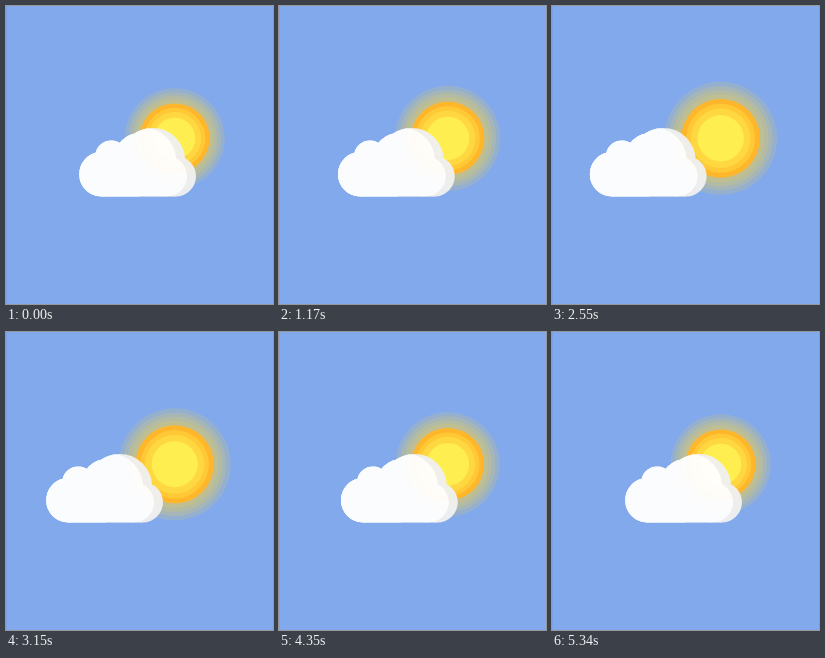
An HTML page for the animation above (5.37 s loop, 267x298 px).

```html
<!DOCTYPE html>
<html lang="en">
<head>
<meta charset="utf-8">
<title>Sun and cloud</title>
<style>
  html, body { margin: 0; width: 100%; height: 100%; overflow: hidden; background: #81a9ec; }
  svg { display: block; width: 267px; height: 298px; }
</style>
</head>
<body>
<svg viewBox="0 0 267 298">
  <defs>
    <g id="lobes">
      <circle cx="22.3" cy="168.2" r="22.3"/>
      <circle cx="32" cy="150.5" r="16"/>
      <circle cx="61" cy="153" r="26"/>
      <circle cx="73.5" cy="154.3" r="32.4"/>
      <circle cx="96.6" cy="170.3" r="20.2"/>
      <rect x="22.3" y="150" width="74.3" height="40.5"/>
    </g>
    <clipPath id="outline">
      <circle cx="22.3" cy="168.2" r="22.3"/>
      <circle cx="32" cy="150.5" r="16"/>
      <circle cx="61" cy="153" r="26"/>
      <circle cx="73.5" cy="154.3" r="32.4"/>
      <circle cx="96.6" cy="170.3" r="20.2"/>
      <rect x="22.3" y="150" width="74.3" height="40.5"/>
    </clipPath>
  </defs>
  <rect width="267" height="298" fill="#81a9ec"/>
  <rect width="1" height="298" fill="#7aa2e4"/>
  <g id="sun"></g>
  <g id="cloud" opacity=".97">
    <use href="#lobes" fill="#f0f0f0"/>
    <g clip-path="url(#outline)" fill="#fff">
      <use href="#lobes" x="-9"/>
      <rect y="120" width="60" height="71"/>
    </g>
  </g>
</svg>
<script>
  const LOOP = 5370;
  const sun = document.getElementById('sun');
  const cloud = document.getElementById('cloud');

  // radius, colour, opacity: halo first, core last
  const rings = [
    [56.5, '#ffd23c', .16], [52, '#ffd23c', .16], [48, '#ffd23c', .16], [44, '#ffd23c', .16],
    [39.4, '#ffb62a', 1], [34.5, '#ffc936', 1], [29.8, '#ffd740', 1], [23.2, '#ffee4f', 1]
  ];
  for (const [r, fill, opacity] of rings) {
    const disc = document.createElementNS('http://www.w3.org/2000/svg', 'circle');
    disc.setAttribute('r', r);
    disc.setAttribute('fill', fill);
    disc.setAttribute('fill-opacity', opacity);
    sun.append(disc);
  }

  function draw(time) {
    const swing = Math.cos(2 * Math.PI * (time % LOOP) / LOOP);
    const x = 55.4 + 17.8 * swing;
    const scale = 0.943 - 0.057 * swing;
    cloud.setAttribute('transform', `translate(${x} 0)`);
    sun.setAttribute('transform', `translate(168.7 132.3) scale(${scale})`);
  }

  const start = performance.now();
  function tick() {
    draw(performance.now() - start);
    requestAnimationFrame(tick);
  }
  draw(0);
  requestAnimationFrame(tick);
</script>
</body>
</html>
```
